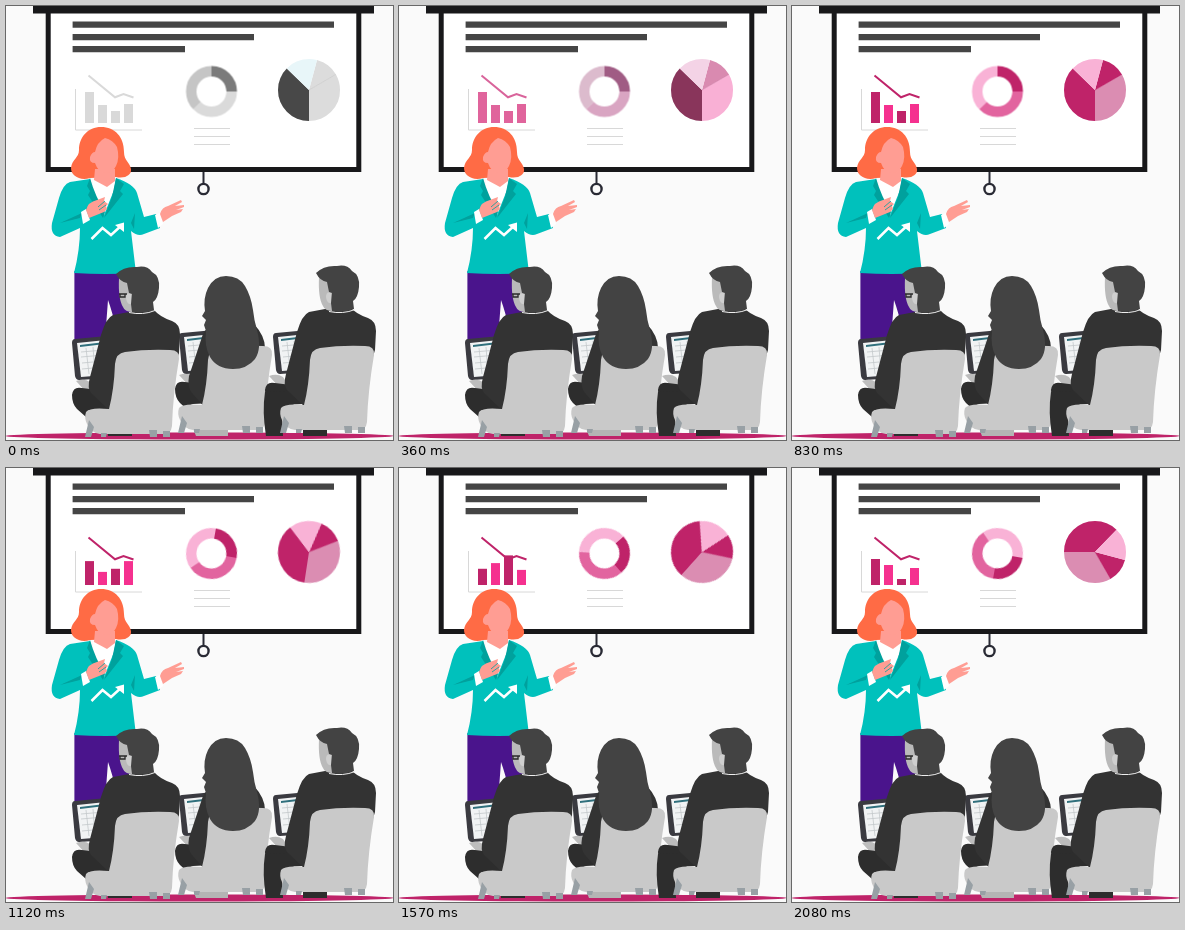
Recreate the animation shown at these times as an HTML page. Size 387 px wide and 434 px high, loop 2.48 s.

```html
<!DOCTYPE html>
<html lang="en">
<head>
<meta charset="utf-8">
<title>Presentation</title>
<style>
  html, body { margin: 0; width: 100%; height: 100%; overflow: hidden; background: #fafafa; }
  svg { display: block; width: 100vw; height: 100vh; }

  .tint { color: var(--a); animation: tint 2480ms infinite; }
  .bar { fill: currentColor; transform-origin: 0 117px; animation: tint 2480ms infinite, grow 2480ms infinite; }
  .slice { fill: none; stroke: currentColor; }
  .ring .slice { stroke-width: 10.5; }
  .pie .slice { stroke-width: 31; }
  .ring { transform-origin: 205.5px 85.5px; --mid: 45deg; --end: 100deg; }
  .pie { transform-origin: 303px 84px; --mid: 39deg; --end: 90deg; }
  .spin { animation: spin 2480ms infinite; }

  .deep { --c: #bf2369; }
  .hot { --c: #f5318f; }
  .soft { --c: #f9b2d6; }

  /* Stops: 360, 600, 1000, 1270, 1540, 1810 and 2080 ms; one step every 30 ms */
  @keyframes tint {
    0% { color: var(--a); animation-timing-function: steps(12); }
    14.516% { color: var(--b); animation-timing-function: steps(8); }
    24.194%, 100% { color: var(--c); }
  }
  @keyframes spin {
    0%, 40.323% { transform: rotate(0deg); animation-timing-function: steps(18); }
    62.097% { transform: rotate(var(--mid)); animation-timing-function: steps(18); }
    83.871%, 100% { transform: rotate(var(--end)); }
  }
  @keyframes grow {
    0%, 40.323% { transform: scaleY(var(--h0)); animation-timing-function: steps(9); }
    51.21% { transform: scaleY(var(--h1)); animation-timing-function: steps(9); }
    62.097% { transform: scaleY(var(--h2)); animation-timing-function: steps(9); }
    72.984% { transform: scaleY(var(--h3)); animation-timing-function: steps(9); }
    83.871%, 100% { transform: scaleY(var(--h4)); }
  }
</style>
</head>
<body>
<svg viewBox="0 0 387 434" preserveAspectRatio="none">
  <defs>
    <g id="chair">
      <path fill="#c9c9c9" d="M119 346Q110 347 109 358Q108 384 103 403Q84 401 80 406Q78 412 81 418Q85 427 94 428H158Q165 428 166 420Q167 388 173 353Q174 344 164 344Q140 343 119 346Z"/>
      <path fill="#98a0a5" d="M83 414L79 431H85L88 421ZM95 427V431H100L101 427ZM143 424L144 431H151V424ZM157 425V431H164V425Z"/>
    </g>
    <g id="laptop">
      <path fill="#3a3a40" d="M69 333L101 330L103 372L73 374Q70 374 69 370L66 337Q66 333 69 333Z"/>
      <path fill="#f1f3f4" d="M71 337L100 334V369L75 371Z"/>
      <path fill="#2f6f7c" d="M74 339L99 336V338L74 341Z"/>
      <path fill="none" stroke="#c3c8cb" stroke-width=".8" d="M75 346L98 344M75 351L98 349M76 357L98 355M76 363L98 361M80 342L83 368M87 341L89 367"/>
    </g>
    <g id="legs">
      <path fill="#bdbdbd" d="M70 375Q78 372 84 376L92 388L80 386Z"/>
      <path fill="#2d2d2d" d="M66 389Q67 380 76 382L108 386L104 403L84 404Q79 405 80 411L71 403Q66 398 66 389Z"/>
    </g>
    <path id="suit" fill="#333" d="M123 306L107 309Q100 312 95 329L84 371Q81 382 85 387L104 405L160 390L173 347L174 328Q174 318 166 315Q154 311 148 304Z"/>
    <g id="head">
      <path fill="#bababa" d="M113 272H128L130 306Q119 307 117 301Q112 293 113 272Z"/>
      <path fill="#434343" d="M110 268Q118 260 131 261Q141 259 146 266Q154 270 153 282Q152 293 147 296L148 304Q137 308 126 306L125 298L126 288L123 287L121 277Q114 276 110 268Z"/>
      <path fill="#cfcfcf" d="M125 288Q120 286 120 292Q121 299 125 298Z"/>
      <path fill="none" stroke="#eee" d="M123 306.5Q137 309.500 149 304.500"/>
    </g>
  </defs>

  <!-- Screen -->
  <path fill="#fff" stroke="#18181a" stroke-width="5" d="M42.200 5V163.500H352.800V5"/>
  <path fill="#18181a" d="M27 0H368V7.500H27Z"/>
  <path fill="#454545" d="M66.600 15.500H328V21.800H66.600ZM66.600 28H248V34.200H66.600ZM66.600 40H179V46.200H66.600Z"/>
  <path fill="none" stroke="#d8d8d8" d="M69.500 83V124H136M188 122.500H224M188 130.500H224M188 138.500H224"/>
  <path fill="none" stroke="#292a34" stroke-width="2" d="M197.500 166V178"/>
  <circle cx="197.500" cy="183" r="5.100" fill="#fafafa" stroke="#292a34" stroke-width="2.400"/>

  <!-- Charts -->
  <polyline class="tint deep" style="--a:#d9d9d9;--b:#d9649b" fill="none" stroke="currentColor" stroke-width="2" points="82.500,69.500 109,91.300 117.500,88 127.500,91.500"/>
  <g style="--a:#d9d9d9;--b:#e0649c">
    <rect class="bar deep" x="79" y="116" width="9" height="1" style="--h0:31;--h1:15;--h2:14;--h3:34;--h4:26"/>
    <rect class="bar hot" x="92" y="116" width="9" height="1" style="--h0:18;--h1:7;--h2:21;--h3:29;--h4:20"/>
    <rect class="bar deep" x="105" y="116" width="9" height="1" style="--h0:12;--h1:21.5;--h2:31;--h3:18.5;--h4:6"/>
    <rect class="bar hot" x="118" y="116" width="9" height="1" style="--h0:19;--h1:30;--h2:16;--h3:8;--h4:17"/>
  </g>
  <g class="ring spin">
    <g transform="translate(205.5 85.5) rotate(-90)">
      <circle class="slice tint deep" r="20.25" pathLength="360" stroke-dasharray="90 270" style="--a:#7b7b7b;--b:#a05c84"/>
      <circle class="slice tint" r="20.25" pathLength="360" stroke-dasharray="136 224" stroke-dashoffset="-90" style="--a:#dadada;--b:#d9a5c2;--c:#e2649f"/>
      <circle class="slice tint soft" r="20.25" pathLength="360" stroke-dasharray="134 226" stroke-dashoffset="-226" style="--a:#c5c5c5;--b:#dcbbcd"/>
    </g>
  </g>
  <g class="pie spin">
    <g transform="translate(303 84) rotate(-90)">
      <circle class="slice tint deep" r="15.5" pathLength="360" stroke-dasharray="45 315" stroke-dashoffset="-15" style="--a:#dcdcdc;--b:#d98ab0"/>
      <circle class="slice tint" r="15.5" pathLength="360" stroke-dasharray="120 240" stroke-dashoffset="-60" style="--a:#dcdcdc;--b:#f9b0d5;--c:#db8db2"/>
      <circle class="slice tint deep" r="15.5" pathLength="360" stroke-dasharray="134 226" stroke-dashoffset="-180" style="--a:#484848;--b:#89355b"/>
      <circle class="slice tint soft" r="15.5" pathLength="360" stroke-dasharray="61 299" stroke-dashoffset="-314" style="--a:#e8f6f9;--b:#f4d3e6"/>
      <path class="tint deep" style="--a:#c4c4c4;--b:#d07fa8" stroke="currentColor" stroke-width=".6" d="M0 0L15.500 26.800"/>
    </g>
  </g>

  <ellipse cx="193.500" cy="430" rx="194" ry="3.500" fill="#bf2369"/>

  <!-- Presenter -->
  <path fill="#4a148c" d="M68.400 265H122L126 320L110 322Q106 305 102 294L99 334H68.400Z"/>
  <path fill="#ff6b45" d="M95 121C82 121 73 131 73 144C73 152 66 153 65 162C65 170 74 175 84 172L110 171C119 173 126 169 125 163C124 156 118 155 118 146C118 131 109 121 95 121Z"/>
  <path fill="#fff" d="M87 174L108 173L110 186L97 210L88 196Z"/>
  <path fill="#ff9d93" d="M89 163H109V175L101 181L88 174Z"/>
  <path fill="#ff9d93" d="M99 132Q107 134 111 141Q114 152 110 160Q106 168 99 167Q92 166 89 157Q83 157 84 151Q86 146 89 146Q91 136 99 132Z"/>
  <path fill="#00c1bc" d="M84 173L64 176Q57 178 53 192L46 217Q44 230 54 231L74 222Q74 244 68 267Q100 269 130 267L125 225Q132 231 138 228L154 222L150 208L138 211L131 187Q128 178 110 172L108 184L98 209Q88 196 84 173Z"/>
  <path fill="#00a19d" d="M84 172L81 180L84 185L82 189L97 212L99 206Q89 190 84 172ZM110 172L118 178L114 185L117 188L98 212L106 191ZM54 217L76 207L74 212ZM129 207L128 223L125 217Z"/>
  <path fill="#fff" d="M75 206L80 203L84 214L77 218ZM149 209L154 207L157 218L152 222Z"/>
  <path fill="#ff9d93" d="M80 204Q82 196 91 194L99 191L98 195L102 198L100 200L101 203L98 206L88 210L83 212Z"/>
  <path fill="none" stroke="#00a19d" stroke-width=".8" d="M92 201L99 195M93 204L100 199"/>
  <path fill="#ff9d93" d="M154 208Q156 201 162 200L175 194L176 196L169 200L178 199V201L170 204L177 203L175 206L166 210L157 216Z"/>
  <path fill="none" stroke="#fff" stroke-width="2.500" d="M85.500 233L96.500 222L105 229L116 219"/>
  <path fill="#fff" d="M109 219L118 216.500V226Z"/>

  <!-- Audience -->
  <use href="#laptop"/>
  <use href="#laptop" x="107" y="-6"/>
  <use href="#laptop" x="201" y="-6"/>

  <use href="#legs" x="103" y="-6"/>
  <path fill="#333" d="M206 320Q198 322 195 334L183 370Q181 381 186 387L200 403L250 380L259 342Q259 330 248 318Z"/>
  <path fill="#b4b4b4" d="M186 420H222V430H190Z"/>
  <use href="#chair" x="93" y="-4"/>
  <path fill="#434343" d="M220 270Q233 270 239 280Q245 290 247 304Q248 314 251 324Q256 343 249 353Q241 363 227 363Q211 363 204 351Q198 340 200 325L198 319L200 314L196 310L199 305Q197 292 202 282Q208 270 220 270Z"/>

  <use href="#legs"/>
  <use href="#suit"/>
  <path fill="#2d2d2d" d="M102 424H126V430H102Z"/>
  <use href="#chair"/>
  <use href="#head"/>
  <path fill="none" stroke="#2b2b2b" stroke-width="1.300" d="M113 288H121M114 288V291H119V288"/>

  <use href="#legs" x="193" y="-5"/>
  <path fill="#2d2d2d" d="M259 386L298 384L285 402L276 406L277 430H260Q256 405 259 386ZM297 420H321V430H297Z"/>
  <use href="#suit" x="196" y="-3"/>
  <use href="#chair" x="195" y="-4"/>
  <use href="#head" x="200" y="-1"/>
</svg>
</body>
</html>
```
